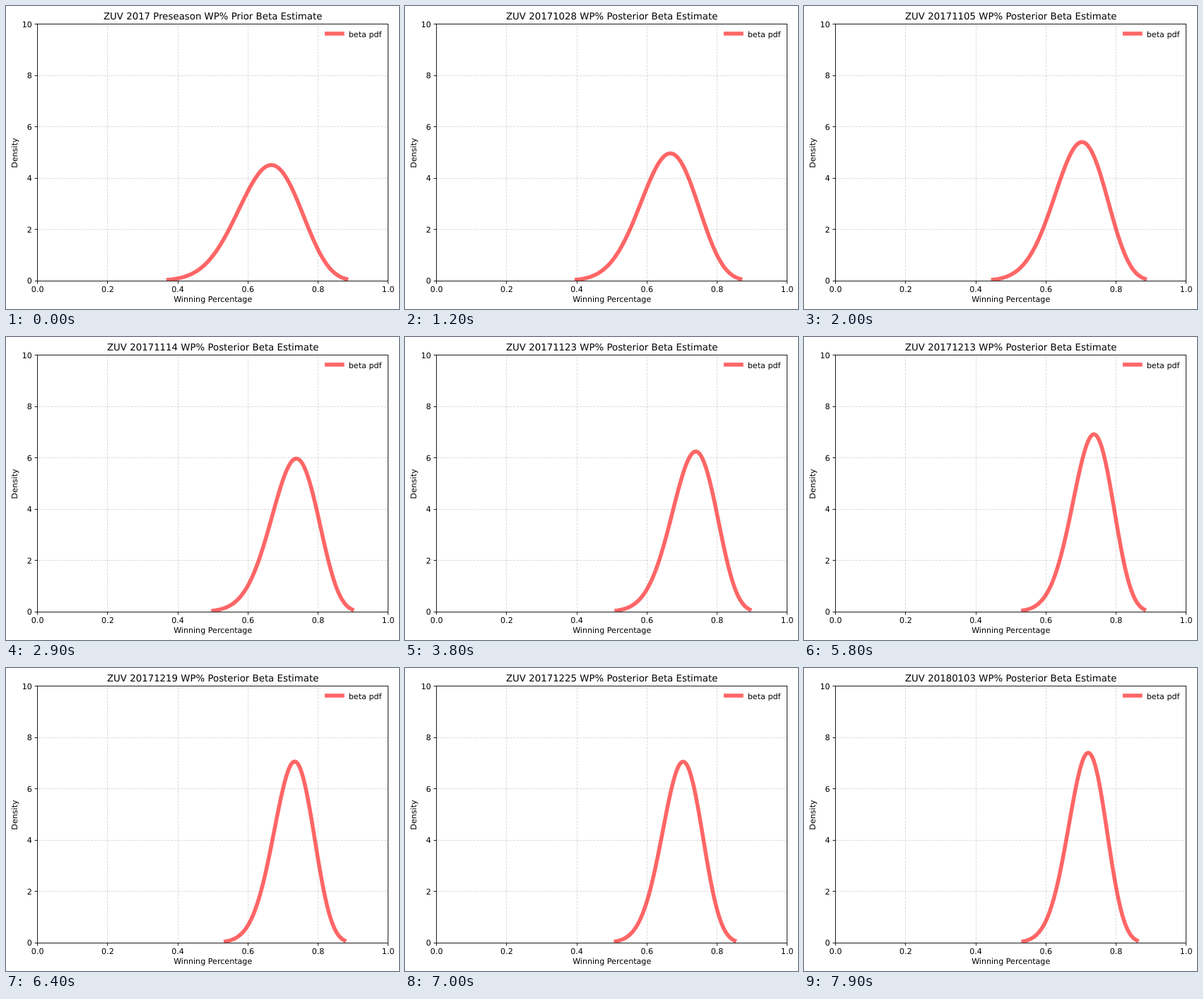
Animation, 556 px wide and 428 px high, one loop 8000 ms. Source, as an HTML page:

```html
<!DOCTYPE html>
<html lang="en">
<head>
<meta charset="utf-8">
<title>Beta estimate</title>
<style>
  html, body { margin: 0; width: 100%; height: 100%; overflow: hidden; background: #fff; }
  svg { display: block; width: 556px; height: 428px; }
  text { font: 11.111px "DejaVu Sans", sans-serif; fill: #000; text-rendering: geometricPrecision; }
  .mid { text-anchor: middle; }
  .end { text-anchor: end; }
  #title { font-size: 13.333px; }
  #grid { stroke: #b0b0b0; stroke-opacity: .5; stroke-width: .89; stroke-dasharray: 3.29 1.42; }
  #axes { stroke: #000; stroke-width: .89; stroke-linecap: square; fill: none; }
  #ticks { stroke: #000; stroke-width: .89; }
  .curve { fill: none; stroke: #f00; stroke-opacity: .6; stroke-width: 5.556; stroke-linecap: square; stroke-linejoin: round; }
</style>
</head>
<body>
<svg viewBox="0 0 556 428">
  <clipPath id="plot"><rect x="44.7" y="25.7" width="496" height="362.4"/></clipPath>
  <g id="grid"></g>
  <g clip-path="url(#plot)"><path id="pdf" class="curve"/></g>
  <g id="ticks"></g>
  <rect id="axes" x="44.5" y="25.5" width="496" height="363"/>
  <g id="labels"></g>
  <text class="mid" x="292.7" y="418">Winning Percentage</text>
  <text class="mid" transform="translate(16 207.5) rotate(-90)">Density</text>
  <path class="curve" d="M453.7 39H475.9"/>
  <text x="484.8" y="44">beta pdf</text>
  <text id="title" class="mid" x="292.7" y="19"></text>
</svg>
<script>
const LEFT = 44.7, BOTTOM = 388.1, WIDTH = 496, HEIGHT = 362.4;
const STEP = 100, FRAMES = 80, DAY = 864e5;
const START = Date.UTC(2017, 9, 17);

// Days since the start on which a game was won or lost
const WINS = [3, 7, 9, 11, 13, 15, 17, 19, 20, 22, 24, 26, 28, 30, 32, 34, 38, 39,
  44, 46, 48, 50, 54, 57, 60, 62, 67, 71, 72, 75, 78];
const LOSSES = [0, 1, 36, 41, 52, 55, 59, 64, 65, 69];
const PRIOR = { wins: 18, losses: 9 };

const $ = id => document.getElementById(id);
const px = x => LEFT + x * WIDTH;
const py = y => BOTTOM - y / 10 * HEIGHT;
const snap = v => Math.floor(v) + .5;

function add(parent, tag, attrs, text = '') {
  const el = document.createElementNS('http://www.w3.org/2000/svg', tag);
  for (const key in attrs) el.setAttribute(key, attrs[key]);
  el.textContent = text;
  $(parent).append(el);
}

function drawAxes() {
  for (let i = 0; i <= 5; i++) {
    const x = snap(px(i / 5));
    const y = snap(py(i * 2));
    if (i % 5) {
      add('grid', 'path', { d: `M${x} ${BOTTOM}V25` });
      add('grid', 'path', { d: `M${LEFT} ${y}H540` });
    }
    add('ticks', 'path', { d: `M${x} 388.5v3.9M44.5 ${y}h-3.9` });
    add('labels', 'text', { class: 'mid', x: px(i / 5), y: 404 }, (i / 5).toFixed(1));
    add('labels', 'text', { class: 'end', x: LEFT - 7.8, y: Math.round(py(i * 2) + 4.2) }, i * 2);
  }
}

// Density between the 0.1% and 99.9% quantiles, as a path of 100 points
function betaPath(wins, losses) {
  const cells = 4000;
  const shape = x => x ** wins * (1 - x) ** losses;
  const mass = Array.from({ length: cells }, (_, i) => shape((i + .5) / cells));
  const total = mass.reduce((a, b) => a + b);
  const quantile = p => {
    let rest = p * total, i = 0;
    while (rest > mass[i]) rest -= mass[i++];
    return (i + rest / mass[i]) / cells;
  };
  const from = quantile(.001), to = quantile(.999);
  const points = Array.from({ length: 100 }, (_, i) => {
    const x = from + (to - from) * i / 99;
    return px(x).toFixed(2) + ' ' + py(shape(x) * cells / total).toFixed(2);
  });
  return 'M' + points.join('L');
}

function show(frame) {
  const played = days => days.filter(day => day < frame).length;
  const date = new Date(START + (frame - 1) * DAY).toISOString().slice(0, 10).replace(/-/g, '');
  $('title').textContent = frame
    ? `ZUV ${date} WP% Posterior Beta Estimate`
    : 'ZUV 2017 Preseason WP% Prior Beta Estimate';
  $('pdf').setAttribute('d', betaPath(PRIOR.wins + played(WINS), PRIOR.losses + played(LOSSES)));
}

let shown = -1;
const begin = performance.now();
function tick() {
  const frame = Math.floor((performance.now() - begin) / STEP) % FRAMES;
  if (frame !== shown) show(shown = frame);
  requestAnimationFrame(tick);
}

drawAxes();
tick();
</script>
</body>
</html>
```
